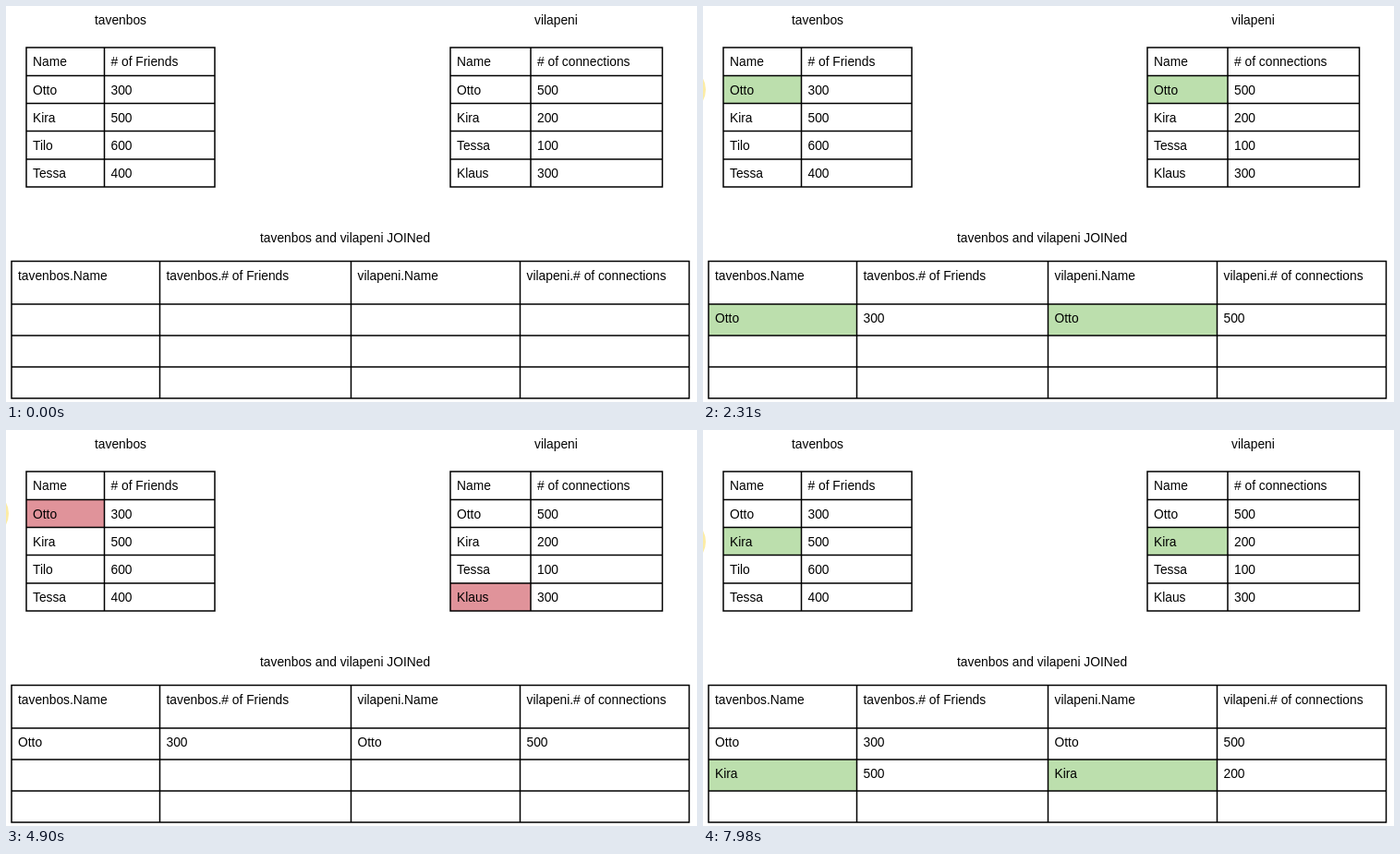
Animation of 748 by 429 pixels, one loop 8 s. Source, as an HTML page with a canvas:

```html
<!DOCTYPE html>
<html lang="en">
<head>
<meta charset="utf-8">
<style>
  html, body { margin: 0; width: 100%; height: 100%; overflow: hidden; background: #fff; }
  canvas { display: block; }
</style>
</head>
<body>
<canvas id="stage" width="748" height="429"></canvas>
<script>
const ctx = document.getElementById('stage').getContext('2d');
const LOOP = 8000, STEP = 70, FADE = 210;

const WHITE = [255, 255, 255], YELLOW = [251, 230, 155];
const GREEN = [188, 223, 173], RED = [224, 147, 154];
const MARKER = [252, 236, 164];

const tables = {
  left: {
    xs: [22, 106.5, 226], ys: [45, 75.5, 105.5, 135.5, 166, 196],
    rows: [['Name', '# of Friends'], ['Otto', 300], ['Kira', 500], ['Tilo', 600], ['Tessa', 400]],
  },
  right: {
    xs: [481, 568, 710.5], ys: [45, 75.5, 105.5, 135.5, 166, 196],
    rows: [['Name', '# of connections'], ['Otto', 500], ['Kira', 200], ['Tessa', 100], ['Klaus', 300]],
  },
  joined: {
    xs: [6, 166.5, 373.5, 556.5, 739.5], ys: [276.5, 323, 357, 391, 425],
    rows: [
      ['tavenbos.Name', 'tavenbos.# of Friends', 'vilapeni.Name', 'vilapeni.# of connections'],
      ['Otto', 300, 'Otto', 500],
      ['Kira', 500, 'Kira', 200],
    ],
  },
};

// Each state: start time, compared rows, their tone, joined rows shown, highlighted joined row
const states = [
  [-LOOP, 0, 0, WHITE, 0, 0],
  [560, 1, 1, YELLOW, 0, 0],
  [1330, 1, 1, GREEN, 0, 0],
  [1890, 1, 1, GREEN, 1, 1],
  [2450, 1, 2, YELLOW, 1, 0],
  [2940, 1, 2, RED, 1, 0],
  [3430, 1, 3, YELLOW, 1, 0],
  [3920, 1, 3, RED, 1, 0],
  [4340, 1, 4, YELLOW, 1, 0],
  [4760, 1, 4, RED, 1, 0],
  [5250, 2, 1, YELLOW, 1, 0],
  [5950, 2, 1, RED, 1, 0],
  [6370, 2, 2, YELLOW, 1, 0],
  [6860, 2, 2, GREEN, 1, 0],
  [7420, 2, 2, GREEN, 2, 2],
].map(([start, left, right, tone, shown, joined]) => ({ start, left, right, tone, shown, joined }));

const mix = (a, b, p) => a + (b - a) * p;

function fillCell({ xs, ys }, row, col, color) {
  ctx.fillStyle = color;
  ctx.fillRect(xs[col], ys[row], xs[col + 1] - xs[col], ys[row + 1] - ys[row]);
}

function drawGrid({ xs, ys }) {
  ctx.beginPath();
  for (const x of xs) { ctx.moveTo(x, ys[0]); ctx.lineTo(x, ys.at(-1)); }
  for (const y of ys) { ctx.moveTo(xs[0], y); ctx.lineTo(xs.at(-1), y); }
  ctx.stroke();
}

function drawText({ xs, ys, rows }, alphaOf = () => 1) {
  rows.forEach((row, r) => {
    ctx.globalAlpha = alphaOf(r);
    row.forEach((text, c) => ctx.fillText(text, xs[c] + 7, ys[r] + 20));
  });
  ctx.globalAlpha = 1;
}

function draw(time) {
  const index = states.findLastIndex(s => s.start <= time);
  const next = states[index], prev = states[Math.max(0, index - 1)];
  const p = Math.min(1, (time - next.start + STEP) / FADE);
  const blend = toneOf => {
    const a = toneOf(prev), b = toneOf(next);
    return `rgb(${a.map((v, i) => mix(v, b[i], p))})`;
  };

  ctx.fillStyle = '#fff';
  ctx.fillRect(0, 0, 748, 429);

  // Marker peeking in from the left edge beside the current row
  for (const row of [1, 2]) {
    ctx.fillStyle = blend(s => s.left === row ? MARKER : WHITE);
    ctx.beginPath();
    ctx.arc(-22.5, 60 + row * 30.5, 25.5, -0.6, 0.6);
    ctx.fill();
  }

  for (let row = 1; row <= 4; row++) {
    for (const side of ['left', 'right'])
      fillCell(tables[side], row, 0, blend(s => s[side] === row ? s.tone : WHITE));
  }
  for (const row of [1, 2]) {
    const color = blend(s => s.joined === row ? GREEN : WHITE);
    for (const col of [0, 2]) fillCell(tables.joined, row, col, color);
  }

  ctx.strokeStyle = ctx.fillStyle = '#000';
  ctx.lineWidth = 1.5;
  ctx.lineCap = 'square';
  Object.values(tables).forEach(drawGrid);

  ctx.font = '13.8px "Liberation Sans", Arial, sans-serif';
  ctx.fillText('tavenbos', 96, 20);
  ctx.fillText('vilapeni', 572, 20);
  ctx.fillText('tavenbos and vilapeni JOINed', 275, 256);
  drawText(tables.left);
  drawText(tables.right);
  const shown = mix(prev.shown, next.shown, p);
  drawText(tables.joined, r => Math.max(0, Math.min(1, shown - r + 1)));
}

const began = performance.now();
function tick() {
  const time = (performance.now() - began) % LOOP;
  draw(Math.floor(time / STEP) * STEP);
  requestAnimationFrame(tick);
}
tick();
</script>
</body>
</html>
```
